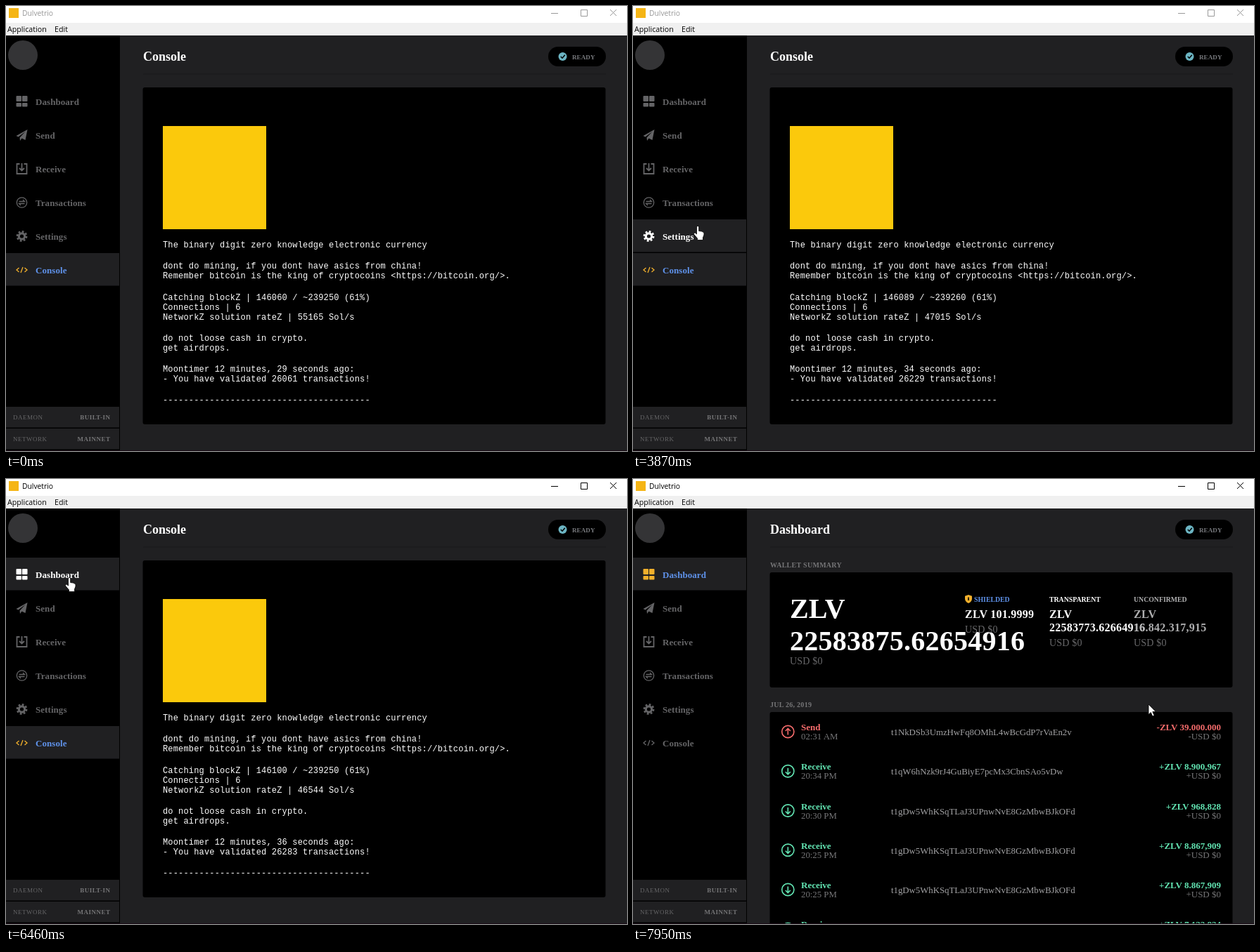
Animation of 883 by 634 pixels, one loop 8 s. Source, as an HTML page:

```html
<!DOCTYPE html>
<html lang="en">
<head>
<meta charset="utf-8">
<title>Wallet console</title>
<style>
  html, body { margin: 0; width: 100%; height: 100%; overflow: hidden; background: #202022; }
  svg { display: block; width: 883px; height: 634px; }
  text { font-family: "Liberation Serif", serif; white-space: pre; }
  .ui { font-family: "Open Sans", sans-serif; }
  .mono { font-family: "Liberation Mono", monospace; }
  .bold { font-weight: 700; }
</style>
</head>
<body>
<svg id="stage" viewBox="0 0 883 634" xmlns="http://www.w3.org/2000/svg"></svg>
<script>
const LOOP = 8000, FOCUS_AT = 6220, OPEN_AT = 6850, REFRESH_AT = 7860;
const BG = '#202022', DIM = '#646466', GREY = '#757577', BLUE = '#5f92ea', AMBER = '#f2b02c';
const RED = '#f56c6c', GREEN = '#62e4b2';
const COIN = 'ZLV';
const WALLETS = {
  a: 't1NkDSb3UmzHwFq8OMhL4wBcGdP7rVaEn2v',
  b: 't1qW6hNzk9rJ4GuBiyE7pcMx3CbnSAo5vDw',
  c: 't1gDw5WhKSqTLaJ3UPnwNvE8GzMbwBJkOFd'
};

// --- motion ---

// each move glides from the previous rest to x, y in steps of about 80 ms
const ENTRY = { x: 925, y: 670 };
const MOVES = [
  { start: 170, end: 330, x: 441, y: 500 },
  { start: 560, end: 810, x: 233, y: 343 },
  { start: 1020, end: 1170, x: 83, y: 435 },
  { start: 2960, end: 3330, x: 92, y: 353 },
  { start: 3640, end: 3870, x: 92, y: 313 },
  { start: 4190, end: 4730, x: 75, y: 128 },
  { start: 4900, end: 5050, x: 90, y: 140 },
  { start: 7480, end: 7630, x: 459, y: 292 },
  { start: 7780, end: 7950, x: 733, y: 321 }
];
const lerp = (a, b, p) => a + (b - a) * p;

function pointer(t) {
  const i = MOVES.filter(move => move.start <= t).length - 1;
  if (i < 0) return null;
  const from = MOVES[i - 1] || ENTRY, to = MOVES[i], span = to.end - to.start;
  const steps = Math.round(span / 80);
  const p = Math.min(1, (Math.floor((t - to.start) / span * steps + .05) + 1) / (steps + 1));
  const x = Math.round(lerp(from.x, to.x, p)), y = Math.round(lerp(from.y, to.y, p));
  const row = x < 161 && y < 399 ? Math.floor((y - 112) / 48) : -1;
  return { x, y, row };
}

// readings after some seconds; those between are interpolated
const READINGS = [
  { s: 0, block: 146060, rate: 55165, valid: 26061 },
  { s: 3, block: 146080, rate: 50395, valid: 26154 },
  { s: 5, block: 146089, rate: 47015, valid: 26229 },
  { s: 6, block: 146098, rate: 46004, valid: 26274 },
  { s: 7, block: 146100, rate: 46544, valid: 26283 }
];

function readings(t) {
  const s = t < 170 ? 0 : Math.min(7, 2 + Math.floor((t - 620) / 1030));
  const to = READINGS.find(r => r.s >= s), from = READINGS[READINGS.indexOf(to) - 1] || to;
  const p = to === from ? 0 : (s - from.s) / (to.s - from.s);
  const value = key => Math.round(lerp(from[key], to[key], p));
  return {
    block: value('block'), rate: value('rate'), valid: value('valid'),
    seconds: 29 + s, height: s > 2 && s < 6 ? 239260 : 239250
  };
}

// --- drawing helpers ---

const rect = (x, y, w, h, fill, r = 0) =>
  `<rect x="${x}" y="${y}" width="${w}" height="${h}" rx="${r}" fill="${fill}"/>`;
const panel = (y, h) => rect(194.5, y, 658, h, '#000', 3);
const disc = (x, y, r, fill) => `<circle cx="${x}" cy="${y}" r="${r}" fill="${fill}"/>`;
const ring = (r, color, width, dash = 'none') =>
  `<circle r="${r}" fill="none" stroke="${color}" stroke-width="${width}" stroke-dasharray="${dash}"/>`;
const line = (d, color, width = 1) =>
  `<path d="${d}" fill="none" stroke="${color}" stroke-width="${width}"/>`;
const shape = (d, fill, stroke = 'none') => `<path d="${d}" fill="${fill}" stroke="${stroke}" stroke-width=".8"/>`;
const at = (x, y, body) => `<g transform="translate(${x} ${y})">${body}</g>`;
const text = (x, y, str, size, fill, gap = 0, anchor = 'start', cls = '') =>
  `<text x="${x}" y="${y}" font-size="${size}" fill="${fill}" class="${cls}" letter-spacing="${gap}" ` +
  `text-anchor="${anchor}">${str.replace(/</g, '&lt;')}</text>`;
const bold = (x, y, str, size, fill, gap = 0, anchor = 'start') =>
  text(x, y, str, size, fill, gap, anchor, 'bold');
const ui = (x, y, str, size, fill) => text(x, y, str, size, fill, 0, 'start', 'ui');

// icons are centred on the origin
const ICONS = {
  Dashboard: c => [-8, .5].map(x => rect(x, -8, 7.5, 8, c, 1) + rect(x, 2, 7.5, 5.5, c, 1)).join(''),
  Send: c => shape('M8-8L5 7 0 4.5-2.5 8-3 3.5 5-5-5 2.5-8 1Z', c),
  Receive: c => line('M-3-7H-7V7H7V-7H3M0-8V2M-3.5-1L0 2.5 3.5-1', c, 1.8),
  Transactions: c => ring(7.2, c, 1.3) + line('M-4-1.5H4L1.5-4M4 1.5H-4L-1.5 4', c, 1.3),
  Settings: c => ring(4.2, c, 3.2) + ring(6.6, c, 2.6, '2.7 2.484'),
  Console: c => line('M-4-3L-7.5 0-4 3M4-3L7.5 0 4 3M1.5-4L-1.5 4', c, 1.3)
};
const ARROW = 'M0 0V14.5L3.3 11.5 5.7 17 8.2 16 5.8 10.6H10.3Z';
const HAND = 'M-1.5 12V2A1.6 1.6 0 0 1 1.7 2V7.5Q6.5 7.8 8 9.2 9.4 10 9 13L7.5 17V20.5H-.5V18L-5 12.8Q-6.2 10.8-5 10.2-3.5 9.6-1.5 12Z';

// --- window parts ---

function titleBar(focused) {
  const ink = focused ? '#000' : '#999';
  return rect(0, 0, 883, 24, '#fff') + rect(0, 24, 883, 18, '#f0f0f0') + rect(4, 3, 14, 14, '#f5b515') +
    ui(23, 14, 'Dulvetrio', 10.3, ink) + ui(2, 37, 'Application', 10.7, '#000') + ui(69, 37, 'Edit', 10.7, '#000') +
    line('M775 10.5H785M817.5 5.5H826.5V14.5H817.5ZM859 5L868 14M868 5L859 14', ink);
}

function menuItem(name, i, active, hovered) {
  const y = 112 + 48 * i, ink = active ? BLUE : hovered ? '#fff' : DIM;
  return (active || hovered ? rect(0, y, 161, 46.5, BG) : '') +
    at(22.5, y + 24, ICONS[name](active ? AMBER : ink)) + bold(42, y + 29, name, 13, ink, .06);
}

function statusItem(y, key, value) {
  return rect(0, y, 161, 29.5, BG) + text(10, y + 18, key, 9, DIM, .5) +
    bold(148.5, y + 18, value, 9, GREY, .5, 'end');
}

function sidebar(page, hoverRow) {
  return rect(0, 42, 162, 592, '#000') + disc(24, 70, 21, '#343436') +
    Object.keys(ICONS).map((name, i) => menuItem(name, i, name === page, i === hoverRow)).join('') +
    statusItem(571, 'DAEMON', 'BUILT-IN') + statusItem(602, 'NETWORK', 'MAINNET');
}

function header(title) {
  return bold(195, 78, title, 18, '#fff') + rect(195, 96.5, 658, 1, '#19191b') +
    rect(771, 58, 82, 28, '#000', 14) + disc(791.5, 72, 6, '#6cb5c3') +
    line('M788.8 72L791 74.2 794.8 69.8', '#000', 1.5) + bold(805, 75.5, 'READY', 9, '#77797d', .1);
}

function consolePage(t) {
  const { block, height, rate, seconds, valid } = readings(t);
  const output = `The binary digit zero knowledge electronic currency

dont do mining, if you dont have asics from china!
Remember bitcoin is the king of cryptocoins <https://bitcoin.org/>.

Catching blockZ | ${block} / ~${height} (61%)
Connections | 6
NetworkZ solution rateZ | ${rate} Sol/s

do not loose cash in crypto.
get airdrops.

Moontimer 12 minutes, ${seconds} seconds ago:
- You have validated ${valid} transactions!

${'-'.repeat(40)}`;
  let y = 330;
  const lines = output.split('\n').map(str => {
    y += str ? 14 : 16.25;
    return text(223, Math.round(y), str, 12, '#fff', .17, 'start', 'mono');
  });
  return panel(116, 480) + rect(223, 171, 147, 147, '#fbc90c') + lines.join('');
}

function balance(x, label, ink, amounts) {
  const lines = amounts.map((str, i) => bold(x, 198 + 19 * i, str, 16, ink, .25));
  return bold(x, 175, label, 9.8, ink) + lines.join('') + usd(x, 200 + 19 * amounts.length);
}
const usd = (x, y) => text(x, y, 'USD $0', 14, '#68686a', .2);

function summary(total, transparent, unconfirmed) {
  return bold(195, 126, 'WALLET SUMMARY', 10, GREY, .28) + panel(133, 164) +
    bold(223, 198, COIN, 40, '#fff') + bold(223, 244, total, 40, '#fff', .25) + usd(223, 264) +
    shape('M477 165L482 166.8V171Q481.5 175 477 177 472.5 175 472 171V166.8Z', AMBER) +
    line('M477 168.5V173', '#000', 1.6) + bold(485, 175, 'SHIELDED', 9.8, BLUE) +
    balance(472, '', '#fff', [COIN + ' 101.9999']) +
    balance(592, 'TRANSPARENT', '#fff', [COIN, transparent]) +
    balance(712, 'UNCONFIRMED', '#afafb0', [COIN, unconfirmed]);
}

function transfer(y, row) {
  const [time, half, wallet, amount] = row.split(' ');
  const sign = amount[0], sent = sign === '-', ink = sent ? RED : GREEN;
  const arrow = line('M0 4.5V-4M-3.5-1L0-4.5 3.5-1', ink, 1.6);
  return at(220.3, y, ring(8.6, ink, 1.6) + `<g transform="scale(1 ${sent ? 1 : -1})">${arrow}</g>`) +
    bold(239, y - 2, sent ? 'Send' : 'Receive', 13, ink) +
    text(239, y + 11, `${time} ${half}`, 12.8, GREY) +
    text(367, y + 5, WALLETS[wallet], 12.8, '#a2a2a4') +
    bold(836, y - 2, `${sign}${COIN} ${amount.slice(1)}`, 13, ink, 0, 'end') +
    text(836, y + 11, sign + 'USD $0', 13, GREY, 0, 'end');
}

function day(y, label, ...rows) {
  const pitch = 56.25;
  return bold(195, y, label, 10, GREY, .28) + panel(y + 7, rows.length * pitch) +
    rows.map((row, i) => transfer(y + 35 + pitch * i, row)).join('');
}

function dashboardPage(refreshed) {
  if (refreshed) {
    return summary('22583875.62654916', '22583773.62664916', '16.842.317,915') +
      day(325, 'JUL 26, 2019', '02:31 AM a -39.000.000', '20:34 PM b +8.900,967', '20:30 PM c +968,828',
        '20:25 PM c +8.867,909', '20:25 PM c +8.867,909', '20:21 PM c +7.122,824');
  }
  return summary('53234542.70966629', '53234440.70976629', '19.282.520,047') +
    day(325, 'JUL 26, 2019', '02:36 AM a -13.000.000', '02:31 AM a -39.000.000',
      '02:31 AM a -39.000.000', '02:31 AM a -20.000.000') +
    day(586, 'JUL 25, 2019', '19:54 PM b +1.929,96');
}

function scene(t) {
  const mouse = pointer(t), open = t >= OPEN_AT, page = open ? 'Dashboard' : 'Console';
  const hoverRow = mouse ? mouse.row : -1;
  return rect(0, 0, 883, 634, BG) + titleBar(t >= FOCUS_AT) + sidebar(page, hoverRow) + header(page) +
    (open ? dashboardPage(t >= REFRESH_AT) : consolePage(t)) + rect(0, 633, 883, 1, '#1a0c16') +
    (mouse ? at(mouse.x, mouse.y, shape(hoverRow < 0 ? ARROW : HAND, '#fff', '#000')) : '');
}

const stage = document.getElementById('stage');
const start = performance.now();
let shown = '';
function tick() {
  const next = scene((performance.now() - start) % LOOP);
  if (next !== shown) stage.innerHTML = shown = next;
  requestAnimationFrame(tick);
}
tick();
</script>
</body>
</html>
```
